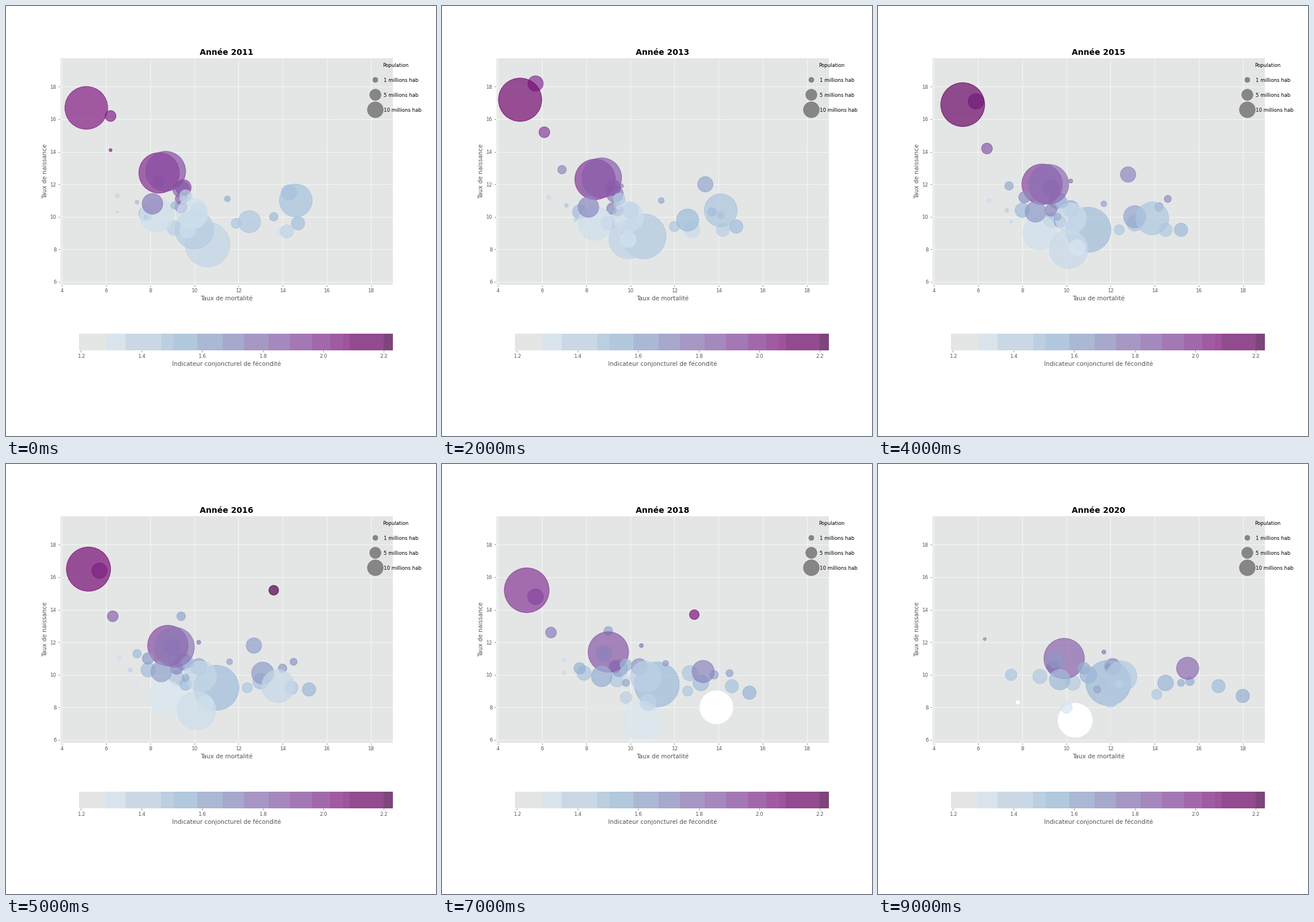
A matplotlib script that plays this animation: 748 px wide and 748 px high, repeating every 10000 ms.

```python
import numpy as np
import matplotlib.pyplot as plt
from matplotlib.animation import FuncAnimation

SIDE = 748
FIRST, LAST = 2011, 2020
YEARS = np.arange(FIRST, LAST + 1)
LOW, HIGH = 1.13, 2.23
ALPHA = 0.7
GREY = "#e4e6e5"

plt.style.use("ggplot")
plt.rcParams["font.family"] = "DejaVu Sans"
plt.rcParams["axes.facecolor"] = GREY

countries = {}


def add(code, pop, *states, jump=0, span=(FIRST, LAST), skip=(), growth=0):
    """Glide through evenly spaced (deaths, births, fertility) states.

    The states cover 2011-2019; the last trend runs on into 2020, where
    `jump` is added to the deaths. Deaths also follow a fading wave.
    """
    steps = np.arange(9)
    knots = np.linspace(0, 8, len(states))
    track = np.array([np.interp(steps, knots, s) for s in zip(*states)])
    track[0] += 0.3 * np.sin(1.9 * steps) * (1 - steps / 8)
    ahead = 2 * track[:, -1:] - track[:, -2:-1]
    track = np.hstack([track, ahead])
    track[0, -1] += jump
    track[:2] = track[:2].round(1)
    size = pop * (1 + growth) ** np.arange(len(YEARS))
    shown = (YEARS >= span[0]) & (YEARS <= span[1]) & ~np.isin(YEARS, skip)
    countries[code] = np.vstack([track, size, shown])


add("AL", 2.9, (6.7, 13.9, 1.85), (7.9, 9.8, 1.35), span=(2013, 2018))
add("AM", 3.0, (10.4, 15.9, 1.6), (8.8, 12.2, 1.63), span=(2016, 2019),
    skip=[2017])
add("AT", 8.6, (9.1, 9.3, 1.43), (9.2, 9.85, 1.5), (9.4, 9.6, 1.46), jump=0.9)
add("AZ", 9.2, (5.8, 19.4, 2.05), (5.8, 17.1, 1.93), (5.6, 14.1, 1.78),
    span=(2012, 2019), growth=0.01)
add("BE", 11.2, (9.4, 11.7, 1.81), (9.5, 11, 1.7), (9.5, 10.2, 1.6), jump=1.5)
add("BG", 7.2, (14.7, 9.6, 1.52), (15.5, 8.8, 1.58), jump=2.4)
add("BY", 9.5, (14.3, 11.5, 1.51), (12.7, 12.6, 1.72), (12.7, 9.3, 1.4),
    span=(2011, 2018))
add("CH", 8.2, (7.8, 10.2, 1.52), (7.9, 10.45, 1.54), (7.9, 10, 1.48),
    jump=0.9)
add("CY", 0.86, (6.5, 11.3, 1.38), (6.4, 11, 1.34), (7.1, 10.8, 1.33),
    span=(2011, 2019))
add("CZ", 10.6, (10.2, 10.4, 1.43), (10.1, 10.5, 1.58), (10.5, 10.5, 1.71),
    jump=1.5)
add("DE", 81.5, (10.6, 8.3, 1.39), (10.9, 9.2, 1.53), (11.3, 9.4, 1.55),
    jump=0.5)
add("DK", 5.7, (9.4, 10.6, 1.75), (9.2, 10.4, 1.74), (9.3, 10.5, 1.7),
    jump=0.1)
add("EE", 1.33, (11.5, 11.1, 1.59), (11.6, 10.6, 1.66), jump=0.3)
add("ES", 46.7, (8.3, 10.1, 1.34), (8.7, 9, 1.33), (8.8, 7.6, 1.21), jump=1.6)
add("FI", 5.45, (9.4, 11.1, 1.83), (9.8, 8.3, 1.37), jump=0.2)
add("FR", 66, (8.4, 12.7, 2.01), (9.1, 11.2, 1.86), jump=0.7)
add("GE", 3.73, (15.4, 18.9, 2.6), (12.5, 13, 2.0), span=(2016, 2019))
add("HR", 4.2, (11.9, 9.6, 1.48), (12.7, 8.9, 1.47), jump=1.3)
add("HU", 9.9, (12.9, 8.8, 1.23), (12.95, 9.6, 1.49), (13.3, 9.5, 1.55),
    jump=1.1)
add("IE", 4.7, (6.2, 16.2, 2.03), (6.4, 12.1, 1.72), span=(2011, 2018))
add("IS", 0.34, (6.2, 14.1, 2.02), (6.3, 12.4, 1.75), skip=range(2012, 2020))
add("IT", 59.8, (10, 9.2, 1.44), (10, 8, 1.37), (10.6, 7, 1.27), jump=1.7)
add("LI", 0.037, (6.5, 10.3, 1.6), span=(2011, 2012))
add("LT", 2.9, (13.6, 10, 1.55), (14.1, 10.6, 1.67), (13.7, 9.8, 1.61), jump=2)
add("LU", 0.57, (7.4, 10.9, 1.52), (6.9, 10, 1.34), jump=0.5)
add("LV", 2.0, (13.9, 9.1, 1.33), (14.5, 11.1, 1.7), (14.5, 9.8, 1.61),
    jump=0.7)
add("MD", 3.56, (10.9, 11.1, 1.27), span=(2012, 2013))
add("ME", 0.62, (9.4, 11.6, 1.65), (10.1, 12.2, 1.77), (10.6, 11.6, 1.77),
    jump=1)
add("MK", 2.07, (9.5, 11.1, 1.46), (9.8, 9.6, 1.34), jump=2.6)
add("MT", 0.46, (7.8, 10, 1.45), (7.4, 9.7, 1.37), (7.3, 8.6, 1.14), jump=0.6)
add("NL", 17, (8.1, 10.8, 1.76), (8.8, 9.8, 1.57), jump=0.8)
add("NO", 5.15, (8.4, 12.2, 1.88), (7.6, 10.2, 1.53))
add("PL", 38, (9.9, 10.2, 1.33), (10.1, 9.9, 1.36), (10.8, 9.9, 1.44),
    jump=1.6)
add("PT", 10.4, (9.7, 9.2, 1.35), (10.4, 8.1, 1.3), (10.9, 8.4, 1.43), jump=1)
add("RO", 19.8, (12.5, 9.7, 1.47), (13.4, 10.3, 1.77), jump=2)
add("RS", 7.1, (14.2, 9.1, 1.4), (14.6, 9.3, 1.52), jump=2.3)
add("SE", 9.9, (9.5, 11.8, 1.9), (9.2, 11.85, 1.86), (8.6, 11.1, 1.71),
    jump=1.1)
add("SI", 2.07, (9.1, 10.7, 1.56), (9.9, 9.3, 1.61), jump=1.4)
add("SK", 5.42, (9.6, 11.3, 1.43), (9.8, 10.5, 1.57), jump=1)
add("TR", 73.7, (5.1, 16.7, 2.05), (5.1, 17.2, 2.12), (5.2, 16.9, 2.15),
    (5.3, 16.1, 2.08), (5.3, 14.3, 1.88), span=(2011, 2019), growth=0.013)
add("UA", 43.5, (14.6, 11, 1.5), (13.8, 9.9, 1.48), (13.9, 7.4, 1.06),
    span=(2011, 2019), skip=[2014])
add("UK", 64, (8.7, 12.8, 1.91), (9.4, 11.1, 1.7), span=(2011, 2016),
    skip=[2012])

table = np.array(list(countries.values()))


def tint(rate):
    """Translucent fertility colour; the palest steps are flat."""
    if rate < 1.195:
        return (1, 1, 1, 1)
    if rate < 1.28:
        return (0.894, 0.902, 0.898, ALPHA)
    return plt.cm.BuPu((rate - LOW) / (HIGH - LOW), alpha=ALPHA)


def box(left, top, right, bottom):
    return [left / SIDE, 1 - bottom / SIDE,
            (right - left) / SIDE, (bottom - top) / SIDE]


fig = plt.figure(figsize=(12, 12), dpi=SIDE / 12, facecolor="white")

ax = fig.add_axes(box(93.5, 89.8, 673.2, 485.1))
ax.set(xlim=(3.896, 19.008), ylim=(5.812, 19.79),
       xticks=range(4, 20, 2), yticks=range(6, 20, 2))
ax.set_xlabel("Taux de mortalité")
ax.set_ylabel("Taux de naissance")
title = ax.set_title("", fontsize=16, fontweight="bold", color="black")
bubbles = ax.scatter([], [], linewidths=1.5)

# Stepped colour scale
bar = fig.add_axes(box(93.5, 569.8, 673.2, 598.8))
steps = [LOW, 1.193, 1.281, 1.347, 1.465, 1.505, 1.584, 1.668, 1.738, 1.82,
         1.89, 1.962, 2.023, 2.064, 2.087, 2.2, HIGH]
bar.set(xlim=(LOW, HIGH), ylim=(0, 1), yticks=[],
        xticks=np.arange(1.2, 2.3, 0.2))
bar.xaxis.set_major_formatter("{x:.1f}")
bar.grid(False)
bar.spines[:].set_visible(False)
for a, b in zip(steps, steps[1:]):
    bar.axvspan(a, b, color=tint((a + b) / 2), lw=0)
bar.set_xlabel("Indicateur conjoncturel de fécondité")

# Size key, laid out in pixels
key = fig.add_axes([0, 0, 1, 1])
key.set(xlim=(0, SIDE), ylim=(SIDE, 0))
key.axis("off")
key.text(677.7, 102, "Population", fontsize=10, ha="center",
         va="center_baseline")
for row, pop in enumerate((1, 5, 10)):
    y = 128.3 + 26 * row
    key.scatter(641.7, y, s=100 * pop, c="#868686", edgecolors="#787878",
                linewidths=1)
    key.text(656.6, y, f"{pop} millions hab", fontsize=10,
             va="center_baseline")


def draw(i):
    rows = table[:, :, i]
    rows = rows[rows[:, 4] > 0]
    colors = [tint(rate) for rate in rows[:, 2]]
    bubbles.set_offsets(rows[:, :2])
    bubbles.set_sizes(100 * rows[:, 3])
    bubbles.set_facecolor(colors)
    bubbles.set_edgecolor(colors)
    title.set_text(f"Année {YEARS[i]}")
    return bubbles, title


anim = FuncAnimation(fig, draw, frames=len(YEARS), interval=1000,
                     init_func=lambda: draw(0), repeat=True)
plt.show()
```
